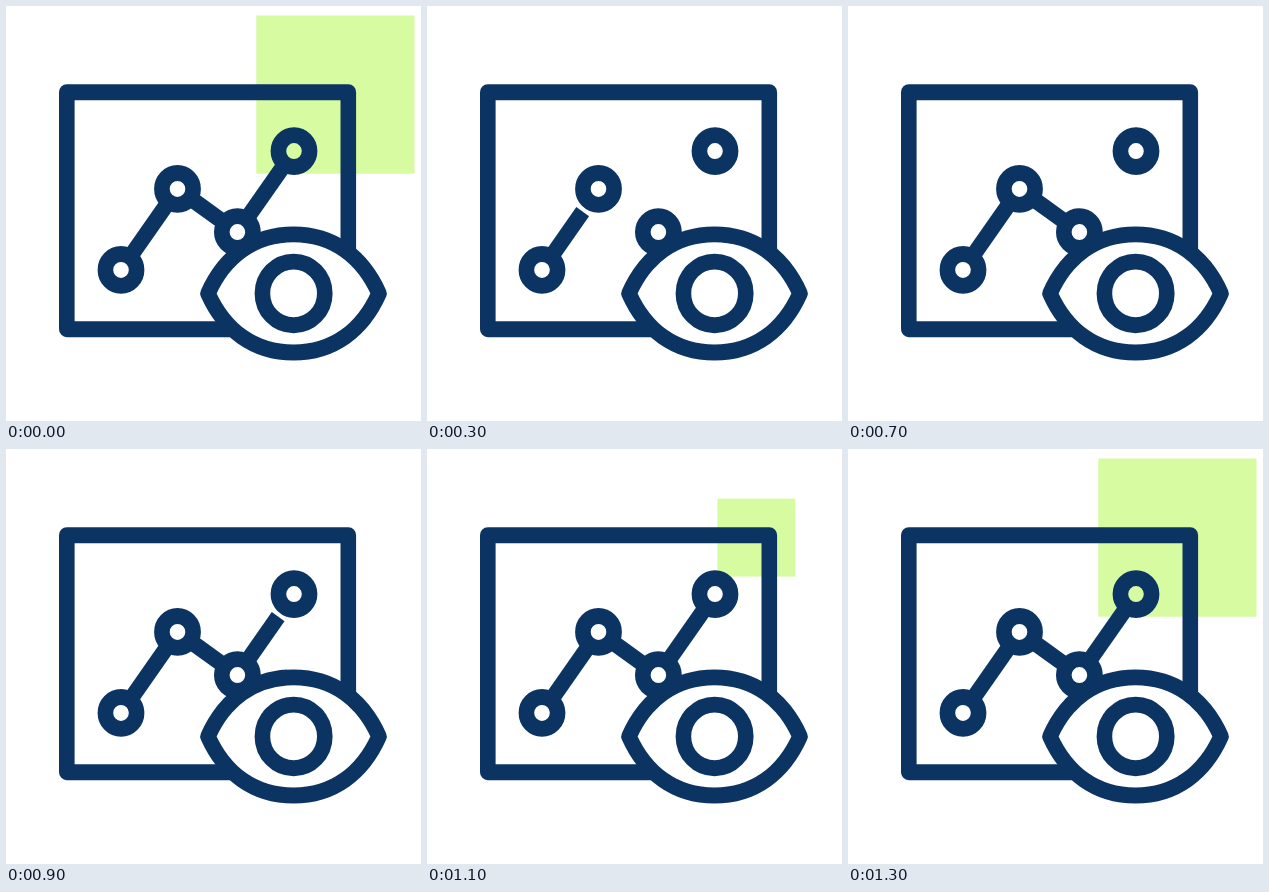
An HTML page for the animation above (1.4 s loop, 415x415 px).

```html
<!DOCTYPE html>
<html lang="en">
<head>
<meta charset="utf-8">
<title>Chart insight icon</title>
<style>
  html, body { margin: 0; width: 100%; height: 100%; overflow: hidden; background: #fff; }
  svg { display: block; width: 100%; height: 100%; }
  .ink { fill: none; stroke: #0c3463; stroke-width: 15.6; stroke-linejoin: round; }
  .lid { fill: #fff; }
</style>
</head>
<body>
<svg viewBox="0 0 415 415">
  <rect id="tile" fill="#d7fba1"/>
  <!-- the icon is drawn slightly taller than wide -->
  <g transform="scale(1 1.02)">
    <path class="ink" d="M342.3 245V84.5H60.8V316.9H230"/>
    <g id="links"></g>
    <g id="nodes"></g>
    <path class="ink lid" d="M202 281.8C218.5 245.5 248 223.9 287.5 223.9S356.5 245.5 373 281.8C356.5 318.1 327 339.7 287.5 339.7S218.5 318.1 202 281.8Z"/>
    <circle class="ink" cx="287.6" cy="281.8" r="31.2"/>
  </g>
</svg>
<script>
  const LOOP = 1400, STEP = 100, TRIM = 13;
  const points = [[115, 258.8], [171.5, 179.4], [231.4, 221.6], [288, 142.2]];
  const linkStart = [100, 400, 700];
  const tileKeys = [[900, 0], [1000, 37], [1100, 78], [1200, 121.5], [1300, 158.2]];
  const tileCenter = [329.4, 88.6];

  const $ = id => document.getElementById(id);
  function add(parent, tag, attrs) {
    const el = document.createElementNS("http://www.w3.org/2000/svg", tag);
    set(el, attrs);
    return parent.appendChild(el);
  }
  function set(el, attrs) {
    for (const key in attrs) el.setAttribute(key, attrs[key]);
  }

  const links = linkStart.map(() => add($("links"), "line", { class: "ink" }));
  points.forEach(([cx, cy]) => add($("nodes"), "circle", { class: "ink", cx, cy, r: 15.6 }));

  // Grow a link from one node towards the next, keeping both node holes clear.
  function drawLink(i, t) {
    const [x1, y1] = points[i], [x2, y2] = points[i + 1];
    const length = Math.hypot(x2 - x1, y2 - y1);
    const dx = (x2 - x1) / length, dy = (y2 - y1) / length;
    const head = Math.min(length * 0.0036 * (t - linkStart[i]), length - TRIM);
    set(links[i], {
      x1: x1 + dx * TRIM, y1: y1 + dy * TRIM,
      x2: x1 + dx * head, y2: y1 + dy * head,
      visibility: head > TRIM ? "visible" : "hidden"
    });
  }

  function tileSize(t) {
    let size = 0;
    for (const [at, value] of tileKeys) if (t >= at) size = value;
    return size;
  }

  function draw(now) {
    const tick = Math.floor((now % LOOP) / STEP) * STEP;
    const t = tick || LOOP; // the loop opens on the finished picture
    links.forEach((_, i) => drawLink(i, t));
    const size = tileSize(t);
    set($("tile"), {
      x: tileCenter[0] - size / 2, y: tileCenter[1] - size / 2,
      width: size, height: size
    });
  }

  const begin = performance.now();
  function frame() {
    draw(performance.now() - begin);
    requestAnimationFrame(frame);
  }
  frame();
</script>
</body>
</html>
```
